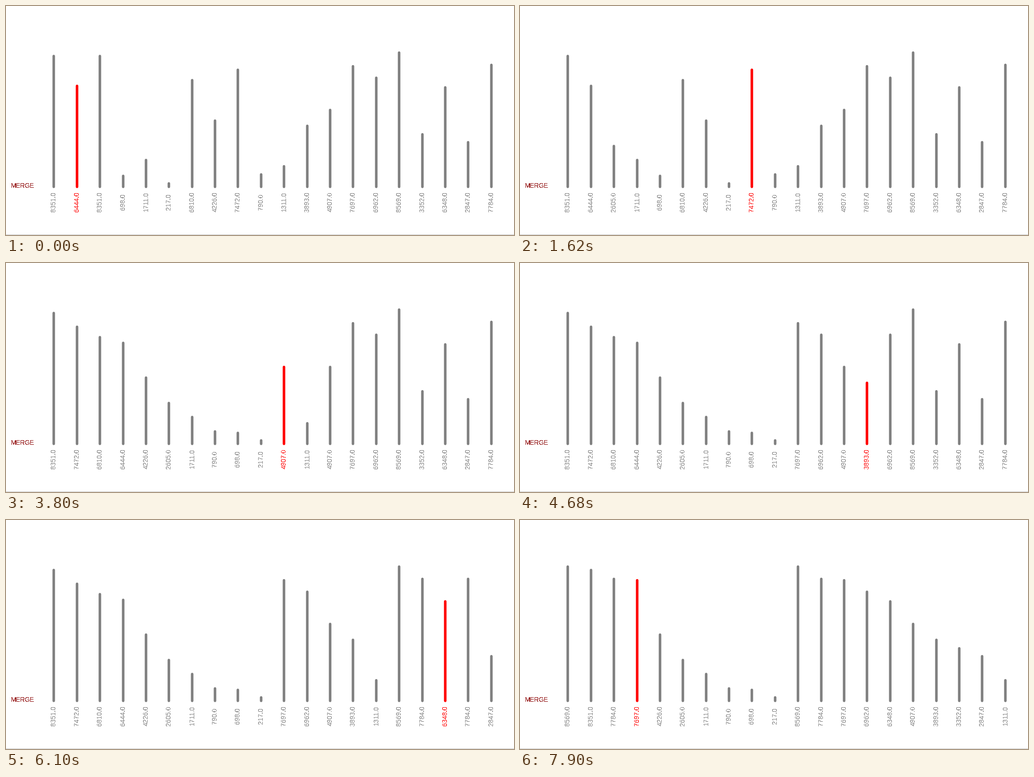
Animation, 1112 px wide and 504 px high, one loop 8 s. Source, as a matplotlib script:

```python
import numpy as np
import matplotlib.pyplot as plt
from matplotlib.animation import FuncAnimation
from matplotlib.collections import LineCollection
from matplotlib.patches import Rectangle

W, H, DPI = 1112, 504, 80
LOOP, INTERVAL = 8000, 20
PX = 72 / DPI  # points per pixel
GRAY, RED, DARK_RED = "#808080", "#ff0000", "#8b0000"
FONT = dict(family="Liberation Sans", antialiased=False)

VALUES = [2605, 6444, 8351, 698, 1711, 217, 6810, 4226, 7472, 790,
          1311, 3893, 4907, 7697, 6962, 8569, 3352, 6348, 2847, 7784]
COUNT = len(VALUES)
SKIP = 3  # writes done before the clip starts
BASE, SCALE = 398, 0.03447

# The pace of the writes drifts slightly between these points
PACE_WRITES = [0, 14, 24, 41, 52, 58, 68]
PACE_TIMES = [0, 1620, 2790, 4680, 6100, 6730, 7900]


def merge_sort(a, lo, hi):
    """Sort a[lo..hi] downwards, yielding the array after every write."""
    if lo >= hi:
        return
    mid = (lo + hi) // 2
    yield from merge_sort(a, lo, mid)
    yield from merge_sort(a, mid + 1, hi)
    left, right = a[lo:mid + 1], a[mid + 1:hi + 1]
    for i in range(lo, hi + 1):
        from_left = left and (not right or left[0] >= right[0])
        a[i] = (left if from_left else right).pop(0)
        yield list(a), i


steps = list(merge_sort(list(VALUES), 0, COUNT - 1))[SKIP:]
times = np.interp(np.arange(PACE_WRITES[-1] + 1), PACE_WRITES, PACE_TIMES)
centers = np.floor(104.95 + 50.38 * np.arange(COUNT)) + 0.5

fig = plt.figure(figsize=(W / DPI, H / DPI), dpi=DPI, facecolor="white")
ax = fig.add_axes([0, 0, 1, 1])
ax.set_xlim(0, W)
ax.set_ylim(H, 0)
ax.axis("off")

ax.add_patch(Rectangle((0, 503), W, 1, color="#c0c0c0", lw=0))
ax.text(10.4, 400, "MERGE", color=DARK_RED, size=14 * PX, **FONT)
bars = ax.add_collection(LineCollection(
    [], linewidths=5.6 * PX, capstyle="round", snap=False))
labels = [ax.text(x + 4, 431, "", rotation=90, rotation_mode="anchor",
                  ha="center", va="baseline", size=14.4 * PX, **FONT)
          for x in centers]


def update(frame):
    now = (frame + 0.5) * INTERVAL
    values, active = steps[np.searchsorted(times, now, side="right") - 1]
    colors = [RED if i == active else GRAY for i in range(COUNT)]
    bars.set_segments([[(x, BASE), (x, BASE - SCALE * value)]
                       for x, value in zip(centers, values)])
    bars.set_color(colors)
    for label, value, color in zip(labels, values, colors):
        label.set_text(f"{value:.1f}")
        label.set_color(color)
    return [bars, *labels]


anim = FuncAnimation(fig, update, frames=LOOP // INTERVAL, interval=INTERVAL,
                     repeat=True, repeat_delay=0, cache_frame_data=False)
plt.show()
```
